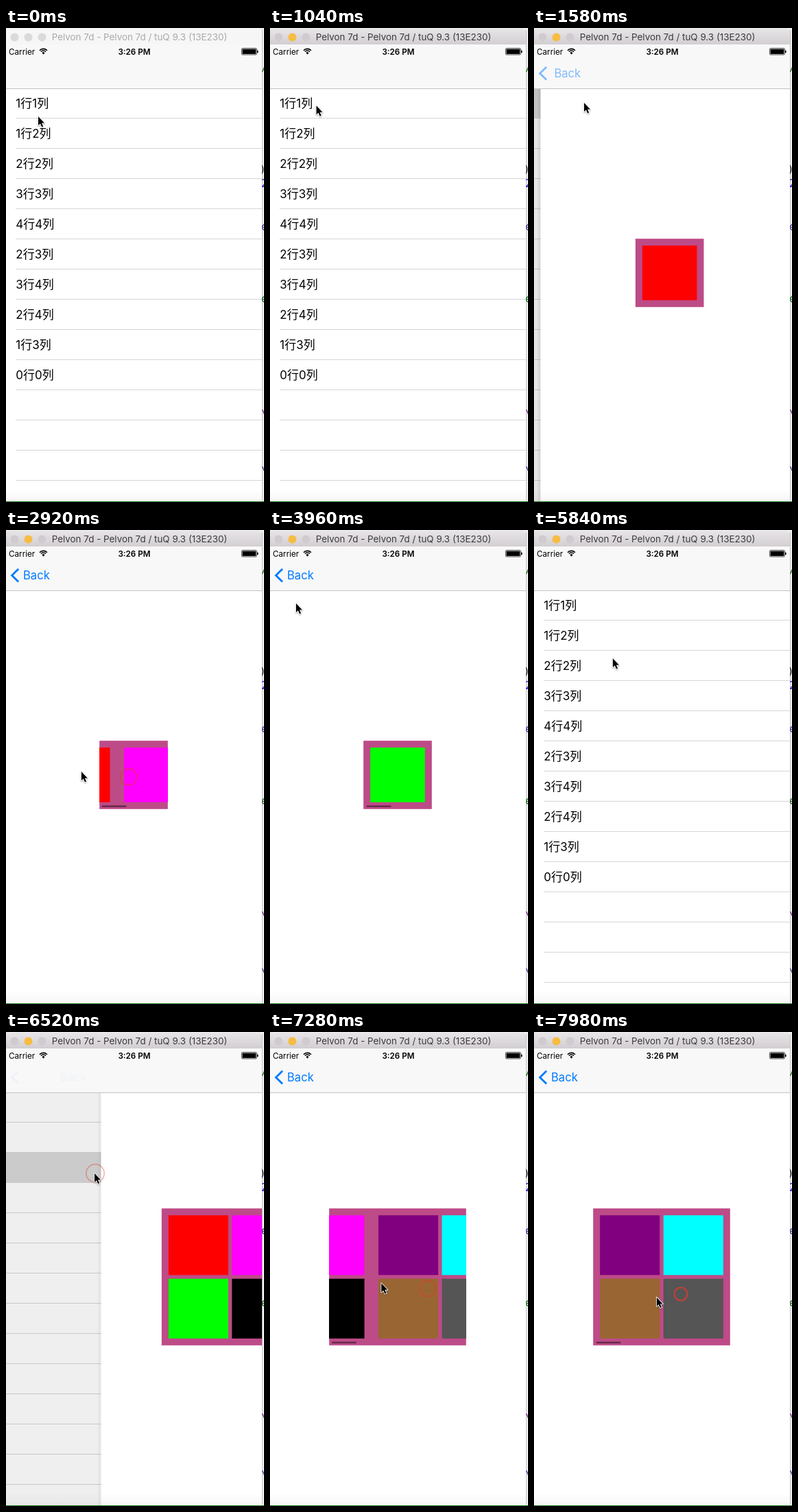
An HTML page with a canvas for the animation above (8000 ms loop, 376 by 691 pixels).

```html
<!DOCTYPE html>
<html lang="en">
<head>
<meta charset="utf-8">
<title>Paged grid demo</title>
<style>
  html, body { margin: 0; width: 100%; height: 100%; overflow: hidden; background: #fff; }
  canvas { display: block; width: 376px; height: 691px; }
</style>
</head>
<body>
<canvas id="stage" width="376" height="691"></canvas>
<script>
const ctx = document.getElementById('stage').getContext('2d');
const LOOP = 8000, LEFT = -2, WIDTH = 375, RIGHT = 373;
const UI = 'Inter, "Noto Sans CJK SC", "Noto Sans CJK", sans-serif';
const ROWS = ['1行1列', '1行2列', '2行2列', '3行3列', '4行4列',
              '2行3列', '3行4列', '2行4列', '1行3列', '0行0列'];
const COLORS = ['#f00', '#f0f', '#0f0', '#000', '#800080', '#0ff', '#963', '#555'];

// Navigation: two pushes and the pop between them
const FIRST_PUSH = 1290, POP = 4726, SECOND_PUSH = 6405;
const DRAG_TIME = 200;

// What the pointer does: it glides from each step to the next
const rest = (t, x, y) => ({ t, end: t, x, y, dx: 0, dy: 0 });
const tap = (t, x, y) => ({ ...rest(t, x, y), end: t + 60, press: true });
const drag = (t, x, y, dy) => ({ t, end: t + DRAG_TIME, x, y, dx: -71, dy, press: true });
const STEPS = [
  rest(0, 47, 129), tap(700, 56, 122), tap(1190, 72, 110), rest(1580, 73, 109),
  drag(2750, 179, 360, -8), drag(3380, 182, 361, -8), rest(3960, 38, 107),
  tap(4610, 30, 67), rest(5060, 80, 144), tap(6290, 130, 206), rest(6520, 129, 206),
  drag(7120, 230, 374, -8), drag(7915, 214, 382, 10)
];
const PRESSES = STEPS.filter(s => s.press);
const DRAGS = STEPS.filter(s => s.dx);
const ACTIVATE = PRESSES[0].t;

const clamp = v => Math.max(0, Math.min(1, v));
const smooth = v => v * v * (3 - 2 * v);
const mix = (a, b, u) => a + (b - a) * u;
const easeOut = v => 1 - (1 - clamp(v)) ** 3;

// Critically damped spring, 1 at the start and 0 at rest
function spring(ms) {
  if (ms <= 0) return 1;
  const x = ms * 0.01826;
  return ms > 520 ? 0 : (1 + x) * Math.exp(-x);
}

function pointer(t) {
  const i = STEPS.findLastIndex(s => s.t <= t);
  const a = STEPS[i], b = STEPS[i + 1];
  const pull = a.dx ? Math.sin(clamp((t - a.t) / DRAG_TIME) * Math.PI / 2) : 0;
  const x = a.x + a.dx * pull, y = a.y + a.dy * pull;
  if (!b || t <= a.end) return [x, y];
  const u = smooth((t - a.end) / (b.t - a.end));
  return [mix(x, b.x, u), mix(y, b.y, u)];
}

// Pages turned and scroll bar opacity since a screen opened
function scroll(t, opened) {
  const ages = DRAGS.filter(d => d.t > opened && d.t <= t).map(d => t - d.t);
  return {
    pages: ages.reduce((sum, age) => sum + easeOut((age - 80) / 250), 0),
    bar: Math.max(0, ...ages.map(age => clamp(age / 60) * clamp((850 - age) / 250)))
  };
}

function rect(x, y, w, h, color) {
  ctx.fillStyle = color;
  ctx.fillRect(x, y, w, h);
}

// Rectangle with slightly softened edges
function softRect(x, y, w, h, color) {
  rect(x + 0.2, y + 0.2, w - 0.4, h - 0.4, color);
}

function text(str, x, y, font, color, align = 'left') {
  ctx.font = font;
  ctx.fillStyle = color;
  ctx.textAlign = align;
  ctx.fillText(str, x, y);
}

function path(points, close) {
  ctx.beginPath();
  points.forEach(([x, y]) => ctx.lineTo(x, y));
  if (close) ctx.closePath();
}

function gradient(x0, y0, x1, y1, from, to) {
  const g = ctx.createLinearGradient(x0, y0, x1, y1);
  g.addColorStop(0, from);
  g.addColorStop(1, to);
  return g;
}

function clipped(x, y, w, h, draw) {
  ctx.save();
  ctx.beginPath();
  ctx.rect(x, y, w, h);
  ctx.clip();
  draw();
  ctx.restore();
}

// Edge of the editor behind the window
function drawEditorEdge() {
  rect(0, 0, 376, 691, '#f1f1f1');
  rect(RIGHT, 3, 1, 687, '#c4c4c4');
  clipped(RIGHT, 0, 3, 690, () => {
    const font = '16px "DejaVu Sans Mono", monospace';
    [['/', 63, '#1c6b1c'], [')', 211, '#222'], ['2', 232, '#2a20d0'], ['e', 295, '#4b3390'],
     ['e', 400, '#1c6b1c'], ['\\', 568, '#703080'], ['\\', 651, '#4b3390']]
      .forEach(([s, y, color]) => text(s, s === ')' ? 369 : 371.7, y, font, color));
  });
}

function drawTitleBar(active) {
  ctx.beginPath();
  ctx.roundRect(-8, 1, RIGHT + 8, 30, [0, 5, 0, 0]);
  ctx.fillStyle = active ? gradient(0, 1, 0, 24, '#e8e5e8', '#d2ced2') : '#f6f6f6';
  ctx.fill();
  const idle = active ? '#cfcbcf' : '#dadada';
  [idle, active ? '#f6bd42' : idle, idle].forEach((color, i) => {
    ctx.beginPath();
    ctx.arc(12.5 + 20 * i, 13.5, 6, 0, 7);
    ctx.fillStyle = color;
    ctx.fill();
  });
  text('Pelvon 7d - Pelvon 7d / tuQ 9.3 (13E230)', 194.5, 18.3, '13.4px ' + UI,
       active ? '#3c3a3c' : '#aaa', 'center');
}

function drawStatusBar() {
  rect(0, 24, RIGHT, 64, '#f8f8f8');
  rect(0, 88, RIGHT, 1, '#c3c3c3');
  text('Carrier', 4, 38.5, '11.7px ' + UI, '#000');
  text('3:26 PM', 187, 38.5, '600 11.7px ' + UI, '#000', 'center');
  ctx.strokeStyle = '#000';
  ctx.lineWidth = 1.6;
  [7.6, 5].forEach(r => {
    ctx.beginPath();
    ctx.arc(54.5, 38, r, -Math.PI * 0.76, -Math.PI * 0.24);
    ctx.stroke();
  });
  ctx.beginPath();
  ctx.moveTo(54.5, 38.7);
  ctx.arc(54.5, 38, 2.8, -Math.PI * 0.76, -Math.PI * 0.24);
  ctx.fillStyle = '#000';
  ctx.fill();
  ctx.lineWidth = 0.7;
  ctx.beginPath();
  ctx.roundRect(343.4, 29.6, 22, 9.4, 1.5);
  ctx.stroke();
  rect(344.5, 30.7, 19.8, 7.2, '#000');
  rect(366, 32.7, 1.5, 3.4, '#000');
}

function drawBack(alpha, shift) {
  if (alpha <= 0) return;
  ctx.save();
  ctx.globalAlpha = alpha;
  path([[18.2, 56.8], [8.6, 66.2], [18.2, 75.6]]);
  ctx.strokeStyle = '#007aff';
  ctx.lineWidth = 2.8;
  ctx.stroke();
  text('Back', 25 + shift, 72.3, '16.6px ' + UI, '#007aff');
  ctx.restore();
}

function drawList(x, selected, glow) {
  rect(0, 89, RIGHT, 601, '#fff');
  if (glow > 0) {
    ctx.globalAlpha = glow;
    rect(x, 88 + 44 * selected, WIDTH, 44, '#d9d9d9');
    ctx.globalAlpha = 1;
    rect(0, 88, RIGHT, 1, '#c3c3c3');
  }
  for (let i = 0; i < 13; i++) {
    rect(x + 16, 131 + 44 * i, WIDTH + 60, 1, '#d6d5d9');
    if (ROWS[i]) text(ROWS[i], x + 16.3, 116 + 44 * i, '17px ' + UI, '#000');
  }
}

function drawGrid(left, n, { pages, bar }) {
  const size = 100 * n, x = left + 188 - size / 2, y = 357 - size / 2;
  const cell = (size - 20 - 5 * (n - 1)) / n;
  softRect(x, y, size, size, '#bd4b87');
  clipped(x, y, size, size, () => {
    COLORS.forEach((color, i) => {
      const k = i % (n * n), page = (i - k) / (n * n);
      const cx = x + (page - pages) * size + 10 + (k % n) * (cell + 5);
      const cy = y + 10 + Math.floor(k / n) * (cell + 5);
      softRect(cx, cy, cell, cell, color);
    });
    ctx.globalAlpha = bar;
    ctx.beginPath();
    ctx.roundRect(x + 3 + pages * 0.8 * n, y + size - 5.5, 36, 2.5, 1.25);
    ctx.fillStyle = 'rgba(0,0,0,.45)';
    ctx.fill();
    ctx.globalAlpha = 1;
  });
}

function drawContent(t) {
  const second = t >= SECOND_PUSH - 60;
  const popping = !second && t >= POP;
  const start = second ? SECOND_PUSH : FIRST_PUSH;
  // away: 1 while the list is in front, 0 while the grid is
  const away = popping ? 1 - spring(t - POP) : spring(t - start);
  const glow = popping ? clamp(1 - (t - POP) / 440) : clamp((t - start + 60) / 20);

  clipped(0, 88, RIGHT, 602, () => {
    drawList(LEFT - 0.3 * WIDTH * (1 - away), second ? 2 : 0, glow);
    if (away < 1) {
      const edge = LEFT + WIDTH * away, shade = 0.1 * (1 - away);
      rect(0, 89, Math.max(0, edge), 601, `rgba(0,0,0,${shade})`);
      rect(edge - 6, 89, 6, 601,
           gradient(edge - 6, 0, edge, 0, 'rgba(0,0,0,0)', `rgba(0,0,0,${shade})`));
      rect(edge, 89, WIDTH, 601, '#fff');
      drawGrid(edge, second ? 2 : 1, scroll(t, start));
    }
    rect(0, 672, RIGHT, 18, gradient(0, 672, 0, 690, 'rgba(0,0,0,0)', 'rgba(0,0,0,.035)'));
  });

  const held = !second && t > POP - 110 ? 0.25 : 1;
  const shown = popping ? clamp(1 - (t - POP) / 220) : clamp((t - start - 100) / 400);
  drawBack(held * shown, 143 * away);
}

function drawPresses(t) {
  for (const press of PRESSES) {
    const age = (t - press.t) / 290;
    if (age < 0 || age > 1) continue;
    ctx.beginPath();
    ctx.arc(press.x, press.y, 8 + 6.5 * age, 0, 7);
    ctx.strokeStyle = `rgba(226,58,42,${1 - 0.75 * age})`;
    ctx.lineWidth = 2.2 - 0.8 * age;
    ctx.stroke();
  }
}

function drawCursor(t) {
  ctx.save();
  ctx.translate(...pointer(t));
  path([[0, 0], [0, 13], [2.9, 10.3], [5.1, 15.3], [7.2, 14.4], [5, 9.5], [9, 9.5]], true);
  ctx.shadowColor = 'rgba(0,0,0,.35)';
  ctx.shadowBlur = 2;
  ctx.shadowOffsetY = 1;
  ctx.strokeStyle = '#fff';
  ctx.lineWidth = 1.8;
  ctx.lineJoin = 'round';
  ctx.stroke();
  ctx.shadowColor = 'transparent';
  ctx.fillStyle = '#000';
  ctx.fill();
  ctx.restore();
}

function frame() {
  const t = performance.now() % LOOP;
  drawEditorEdge();
  drawTitleBar(t >= ACTIVATE);
  drawStatusBar();
  drawContent(t);
  rect(0, 690, 376, 1, '#1c7a1c');
  drawPresses(t);
  drawCursor(t);
  requestAnimationFrame(frame);
}
frame();
</script>
</body>
</html>
```
